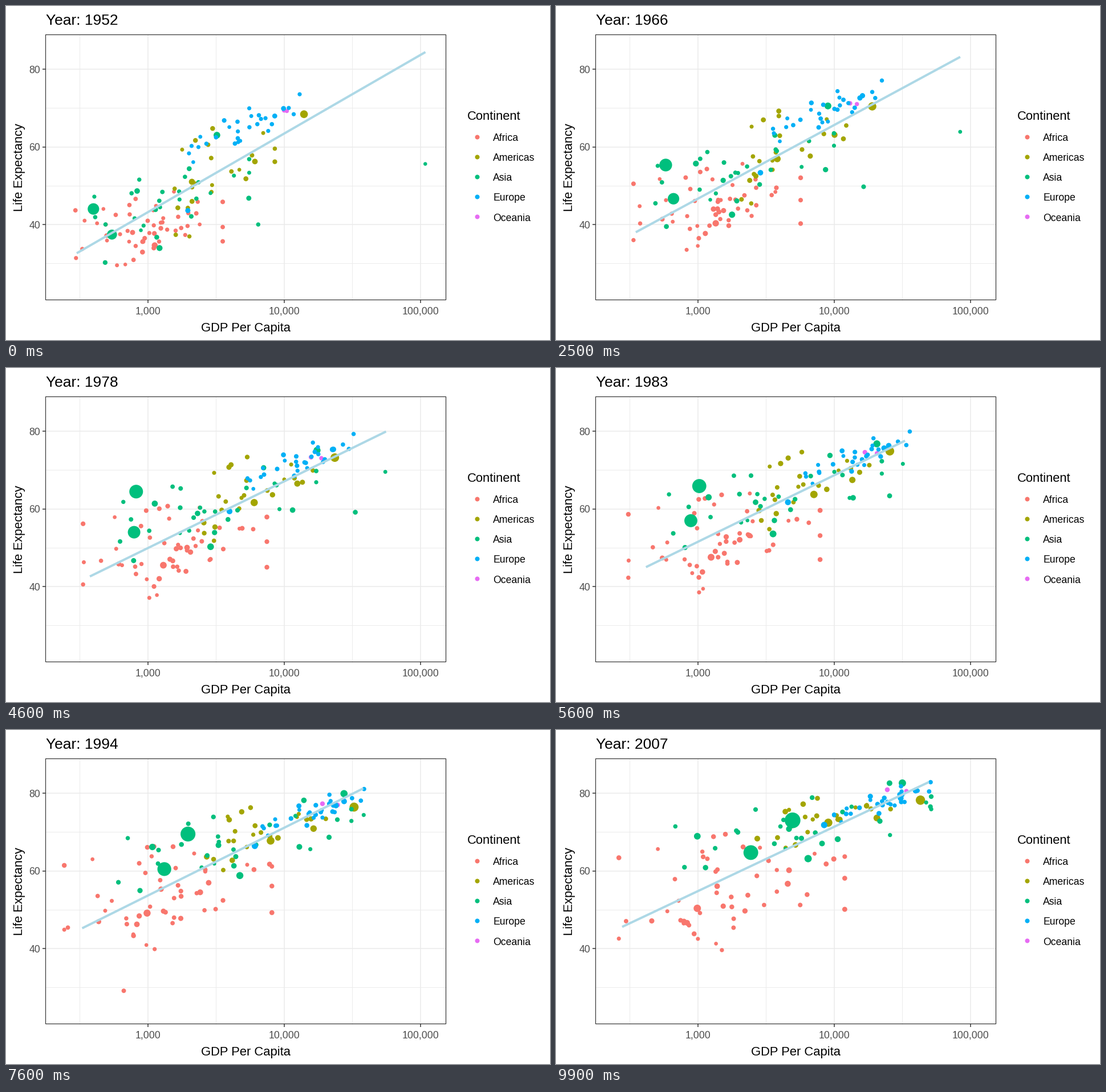
Recreate the animation shown at these times as a matplotlib script. Size 954 px wide and 587 px high, loop 10000 ms.

```python
import numpy as np
import matplotlib.pyplot as plt
from matplotlib.animation import FuncAnimation

W, H = 954, 587
FRAMES, INTERVAL = 100, 100
LEFT, RIGHT, TOP, BOTTOM = 69.5, 771.5, 50.5, 516.5
TIME = np.linspace(1952, 2007, FRAMES)
YEARS = np.arange(1952, 2008, 5)
KEYS = [1952, 1972, 1983, 1994, 2007]

COLORS = {"Africa": "#F8766D", "Americas": "#A3A500", "Asia": "#00BF7D",
          "Europe": "#00B0F6", "Oceania": "#E76BF3"}
rng = np.random.default_rng(52)
dots = []


def px(log_gdp):
    return 248.5 + 239.2 * (log_gdp - 3)


def py(life):
    return 111 + 6.825 * (80 - life)


def radius(pop):
    size = 1 + 5 * np.sqrt(np.clip(pop / 1319, 0, 1))
    return .75 * (2.845 * size + .945) + .3


def add(cont, log_gdp, life, pop0, pop1):
    r = radius(np.interp(TIME, [1952, 2007], [pop0, pop1]))
    dots.append((COLORS[cont], px(log_gdp), py(life), r))


def scores(n, mix):
    """Standard scores per country and year that slowly trade places."""
    a, b = rng.standard_normal((2, n, 1))
    turn = mix * np.linspace(0, 1, len(YEARS))
    z = a * np.cos(turn) + b * np.sin(turn) + rng.normal(0, .06, (n, len(YEARS)))
    z = (z - z.mean(0)) / z.std(0)
    return np.clip(z, -1.8, 1.8)


def crowd(cont, n, gdp, gdp_sd, life, life_sd, corr, mix):
    """Countries spread around the continent's mean log GDP and life."""
    zx, zn = scores(n, mix), scores(n, mix)
    zy = np.clip(corr * zx + np.sqrt(1 - corr ** 2) * zn, -1.9, 1.9)
    xs = np.interp(YEARS, KEYS, gdp) + zx * np.linspace(*gdp_sd, len(YEARS))
    ys = np.interp(YEARS, KEYS, life) + zy * np.linspace(*life_sd, len(YEARS))
    for x, y in zip(xs, ys):
        pop = min(rng.lognormal(2.2, 1.1), 130)
        add(cont, np.interp(TIME, YEARS, x), np.interp(TIME, YEARS, y), pop * .4, pop)


def path(cont, pop0, pop1, *points):
    """A standout country through (year, GDP, life) points."""
    years, gdp, life = np.array(points).T
    add(cont, np.interp(TIME, years, np.log10(gdp)),
        np.interp(TIME, years, life), pop0, pop1)


crowd("Africa", 51, [3.01, 3.2, 3.2, 3.13, 3.25], (.3, .46),
      [39, 47.5, 52, 54, 55], (5, 9), .4, .6)
path("Africa", 2.5, 9, (1952, 493, 40), (1982, 882, 46), (1987, 848, 44),
     (1992, 737, 23.6), (1997, 590, 36), (2007, 863, 46))

crowd("Americas", 23, [3.5, 3.7, 3.79, 3.81, 3.91], (.24, .28),
      [53, 62.4, 66.5, 70, 73.5], (9, 4), .65, .4)
path("Americas", 57, 190, (1952, 2109, 51), (1972, 4986, 59.5),
     (1982, 7031, 63.3), (2007, 9066, 72.4))
path("Americas", 157, 301, (1952, 13990, 68.4), (1972, 21806, 71.3),
     (1982, 25010, 74.7), (2007, 42952, 78.2))

crowd("Asia", 28, [3.15, 3.38, 3.55, 3.6, 3.74], (.33, .54),
      [46, 57, 63, 67, 70.7], (8.5, 6.5), .7, .5)
path("Asia", .2, 2.5, (1952, 108382, 55.6), (1957, 113523, 58), (1967, 80895, 64.6),
     (1972, 109348, 67.7), (1977, 59265, 69.3), (1982, 31354, 71.3), (2007, 47307, 77.6))
path("Asia", 4, 28, (1952, 6460, 40), (1972, 24837, 54), (1977, 34168, 58.7),
     (1987, 21198, 66.3), (2007, 21655, 72.8))
path("Asia", 86, 127, (1952, 3217, 63), (1962, 6577, 68.7), (1972, 14779, 73.4),
     (1992, 26825, 79.4), (2007, 31656, 82.6))
path("Asia", 372, 1110, (1952, 547, 37.4), (1972, 724, 50.7), (1982, 856, 56.6),
     (2002, 1747, 62.9), (2007, 2452, 64.7))
path("Asia", 556, 1319, (1952, 400, 44), (1957, 576, 50.5), (1962, 488, 44.5),
     (1967, 613, 58.4), (1972, 677, 63.1), (1982, 962, 65.5), (2002, 3119, 72),
     (2007, 4959, 73))

crowd("Oceania", 2, [4.01, 4.2, 4.27, 4.33, 4.46], (.01, .07),
      [69.3, 71.9, 74.4, 77, 80.7], (.2, .5), .5, 0)

crowd("Europe", 29, [3.7, 4.06, 4.18, 4.2, 4.36], (.23, .2),
      [64.8, 71.2, 73.2, 75, 77.7], (4.6, 2.7), .85, .3)
path("Europe", 22, 71, (1952, 1969, 43.6), (1957, 2219, 48), (1972, 3451, 57),
     (2007, 8458, 71.8))

# Trend line: year, then both ends in pixels
trend_keys = np.array([
    (1952, 124, 434.5, 735.5, 81), (1960, 139.5, 411.5, 729.5, 76),
    (1967, 140, 395, 705, 92), (1972, 142.5, 381, 736, 85.5),
    (1977, 146, 368, 672, 110), (1983, 158, 350, 612, 128),
    (1994, 134.5, 348, 626, 103), (2002, 101, 363, 643, 92),
    (2007, 116, 346, 654, 91.5)]).T
x0, y0, x1, y1 = (np.interp(TIME, trend_keys[0], v) for v in trend_keys[1:])

plt.rcParams["font.family"] = "Liberation Sans"
fig = plt.figure(figsize=(W / 72, H / 72), dpi=72, facecolor="white")
ax = fig.add_axes([0, 0, 1, 1])
ax.set(xlim=(0, W), ylim=(H, 0))
ax.axis("off")


def line(xs, ys, color, width, z=1):
    return ax.plot(xs, ys, color=color, lw=width, zorder=z, solid_capstyle="butt")[0]


def label(x, y, s, size, ha="left", color="black", **kw):
    return ax.text(x, y, s, fontsize=size, ha=ha, va="baseline", color=color, **kw)


for i, log_gdp in enumerate(np.arange(2.5, 5.1, .5)):
    line([px(log_gdp)] * 2, [TOP, BOTTOM], "#EBEBEB", 1.5 if i % 2 else 1)
for life in range(30, 81, 10):
    line([LEFT, RIGHT], [py(life)] * 2, "#EBEBEB", 1 if life % 20 else 1.5)
for log_gdp in (3, 4, 5):
    line([px(log_gdp)] * 2, [BOTTOM, BOTTOM + 5.5], "#333333", 1.5)
    label(px(log_gdp), 542, f"{10 ** log_gdp:,}", 17.6, "center", "#4D4D4D")
for life in (40, 60, 80):
    line([LEFT - 5.5, LEFT], [py(life)] * 2, "#333333", 1.5)
    label(60, py(life) + 6.7, str(life), 17.6, "right", "#4D4D4D")
ax.add_patch(plt.Rectangle((LEFT, TOP), RIGHT - LEFT, BOTTOM - TOP, fill=False,
                           ec="#333333", lw=1.2, zorder=5, snap=False))

label(420.5, 572, "GDP Per Capita", 22, "center")
label(29, 283.5, "Life Expectancy", 22, "center", rotation=90, rotation_mode="anchor")
label(809, 200, "Continent", 22)
for i, (name, color) in enumerate(COLORS.items()):
    y = 229.5 + 35.2 * i
    ax.scatter([826], [y], s=8 ** 2, c=color, linewidths=0)
    label(854, y + 7.3, name, 17.6)

tints, *tracks = zip(*dots)
X, Y, R = (np.array(t).T for t in tracks)
cloud = ax.scatter(X[0], Y[0], s=(2 * R[0]) ** 2, c=tints, linewidths=0, zorder=3)
trend = line([], [], "#ADD8E6", 4, 4)
title = label(69.5, 33, "", 26.4)


def draw(k):
    cloud.set_offsets(np.column_stack([X[k], Y[k]]))
    cloud.set_sizes((2 * R[k]) ** 2)
    trend.set_data([x0[k], x1[k]], [y0[k], y1[k]])
    title.set_text(f"Year: {TIME[k]:.0f}")
    return cloud, trend, title


anim = FuncAnimation(fig, draw, frames=FRAMES, interval=INTERVAL, repeat=True,
                     repeat_delay=0, blit=False)
plt.show()
```
